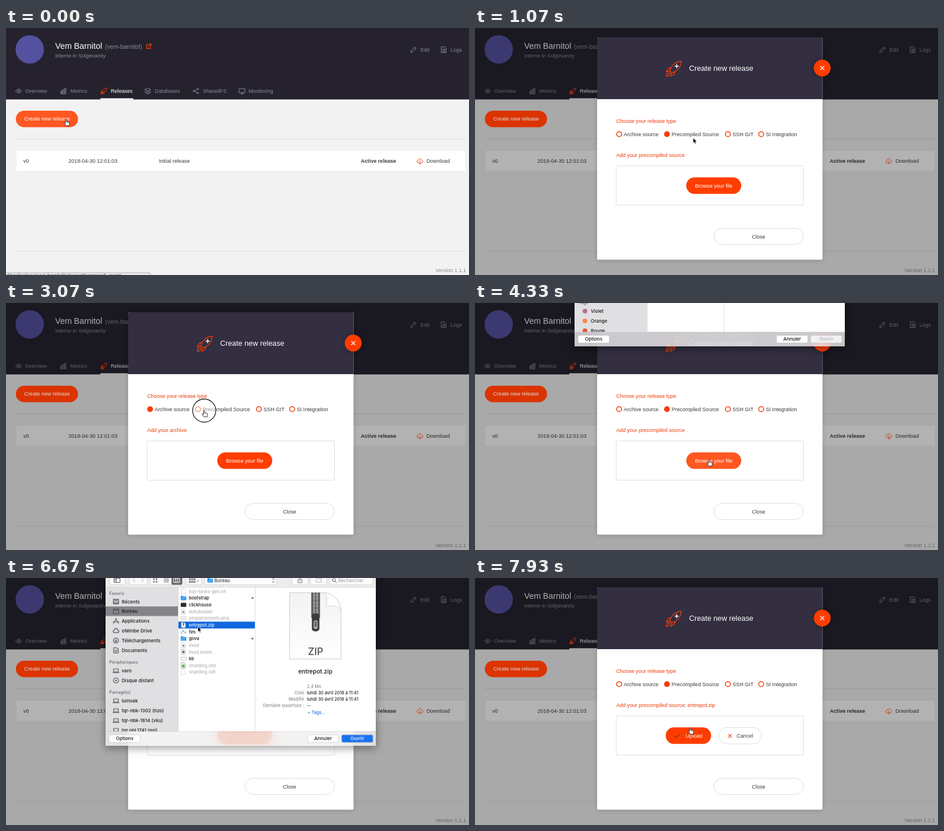
An HTML page that plays this animation: 800x427 px, repeating every 8000 ms.

```html
<!DOCTYPE html>
<html lang="fr">
<head>
<meta charset="utf-8">
<title>Create new release</title>
<style>
  html, body { margin: 0; width: 100%; height: 100%; overflow: hidden; }
  #stage { position: relative; width: 800px; height: 427px; overflow: hidden; background: #f2f2f3; }
  svg { position: absolute; left: 0; top: 0; display: block; }
  #web { font: 9.1px "Liberation Sans", Arial, sans-serif; }
  #sheet { position: absolute; left: 0; top: 0; width: 800px; height: 295px; font: 8.1px Inter, sans-serif; will-change: transform; }
  #shadow { position: absolute; left: 172px; top: 0; width: 467px; height: 294.5px; box-shadow: 0 4px 14px rgba(0,0,0,.4), 0 0 1px rgba(0,0,0,.6); }
  #footer { position: absolute; left: 172px; top: 270px; width: 467px; height: 24.5px; background: rgba(240,240,240,.8); backdrop-filter: blur(13px); }
  .line { fill: none; stroke-linecap: round; stroke-linejoin: round; }
  .mid { text-anchor: middle; }
  .end { text-anchor: end; }
</style>
</head>
<body>
<div id="stage">
  <svg id="web" width="800" height="427"></svg>
  <div id="sheet">
    <div id="shadow"></div>
    <svg id="browser" width="800" height="270"></svg>
    <div id="footer"></div>
    <svg id="actions" width="800" height="25" viewBox="0 270 800 25" style="top:270px"></svg>
  </div>
  <svg id="pointer" width="800" height="427"></svg>
</div>
<script>
const LOOP = 8000;
const ORANGE = '#ff3d00', HOVER = '#ff5722', MUTED = '#8b8993', INK = '#3b3a42';
const $ = id => document.getElementById(id);

const text = (x, y, s, fill, more = '') => `<text x="${x}" y="${y}" fill="${fill}" ${more}>${s}</text>`;
const rect = (x, y, w, h, fill, more = '') => `<rect x="${x}" y="${y}" width="${w}" height="${h}" fill="${fill}" ${more}/>`;
const line = (d, stroke, width = 1, more = '') => `<path class="line" d="${d}" stroke="${stroke}" stroke-width="${width}" ${more}/>`;
const disc = (x, y, r, fill, more = '') => `<circle cx="${x}" cy="${y}" r="${r}" fill="${fill}" ${more}/>`;
const group = (id, body) => `<g id="${id}">${body}</g>`;
const icon = (x, y, d, stroke = MUTED, width = 1) => line(d, stroke, width, `transform="translate(${x} ${y})"`);
const rocket = (x, y, scale, width) => line(
  'M-7 4C-5-4 1-12 13-13C12-1 4 5-4 7ZM-5-2L-9-1-13 5-7 4M2 5L1 9-5 13-4 7M-8 7C-12 7-13 10-13 13C-10 13-7 12-7 8',
  ORANGE, width, `transform="translate(${x} ${y}) scale(${scale})"`);

// ---- web page -------------------------------------------------------------
const tabs = [
  [22, 33, 'Overview', 'M-5 0C-2-4.5 2-4.5 5 0C2 4.5-2 4.5-5 0ZM-1.5 0a1.5 1.5 0 1 0 3 0a1.5 1.5 0 1 0-3 0'],
  [99, 111, 'Metrics', 'M-4.5 4.5V0h2.3v4.5ZM-1.2 4.5V-2.5h2.3v7ZM2.3 4.5V-4.5h2.3v9Z'],
  [245, 257, 'Databases', 'M0-5L5-2.5 0 0-5-2.5ZM-5 0L0 2.5 5 0M-5 2.5L0 5 5 2.5'],
  [328, 340, 'SharedFS', 'M-1.5-.6L2-2.8M-1.5.6L2 2.8M-4.6 0a1.5 1.5 0 1 0 3 0a1.5 1.5 0 1 0-3 0M2-3.5a1.5 1.5 0 1 0 3 0a1.5 1.5 0 1 0-3 0M2 3.5a1.5 1.5 0 1 0 3 0a1.5 1.5 0 1 0-3 0'],
  [408, 419, 'Monitoring', 'M-5-4H5V2.5H-5ZM0 2.5V5M-2.5 5H2.5']
];

const page =
  rect(0, 0, 800, 123.5, '#25222e') +
  disc(41, 37, 24.5, '#5451a0') +
  text(85, 36, 'Vem Barnitol', '#fff', 'font-size="14.3"') +
  text(171, 36, '(vem-barnitol)', MUTED, 'font-size="10.4"') +
  icon(246.5, 31.5, 'M-.5-3H-3.5V3.8H3V1M1-3.8H4V-.8M4-3.8L-.5.7', ORANGE, 1.2) +
  text(85, 51, 'interne in Solgevanity', MUTED) +
  icon(704, 37.5, 'M-4.5 4.5L-3.8 1.5 2.5-4.8 4.8-2.5-1.5 3.8ZM1-3.3L3.3-1') + text(716, 41, 'Edit', MUTED) +
  icon(756.5, 37.5, 'M-4-5H1.5L4-2.5V5H-4ZM-2-1H2M-2 1H2M-2 3H2') + text(768, 41, 'Logs', MUTED) +
  tabs.map(([x, tx, label, d]) => icon(x, 109, d) + text(tx, 112, label, MUTED)).join('') +
  text(181, 112, 'Releases', '#fff') + rect(163, 121.5, 57, 2.3, '#fff') +
  line('M17 191.5H795M17 386H795', '#dcdcde') +
  rect(17.5, 211.5, 777, 36, '#fff', 'stroke="#ebebed" stroke-width=".7" rx="1"') +
  text(30, 233, 'v0', INK) + text(108, 233, '2018-04-30 12:01:03', INK) + text(264, 233, 'Initial release', INK) +
  text(613, 233, 'Active release', INK, 'font-weight="700"') + text(726.5, 233, 'Download', INK) +
  text(742, 422, 'Version 1.1.1', '#8d8d90') +
  group('status', rect(-2, 423, 252, 8, '#e9e9ea', 'rx="2" stroke="#a5a5a8" stroke-width=".8"') +
    text(-8, 431, 'oad/applications/vem-barnitol/releases?command=create', '#333', 'font-size="8.2"'));

const bright = rocket(169, 109, .41, 2.4) +
  icon(715, 230, 'M-2 3H-3C-6 2.5-5.5-1-3-1C-2.5-5 2.5-5 3-1.5C6-1.5 6 3 3 3H2M0-.5V5M-1.6 3.5L0 5 1.6 3.5', '#ee4310') +
  rect(17, 143, 107.5, 28.5, ORANGE, 'rx="14.2" id="create"') + text(31.5, 160.3, 'Create new release', '#fff');

const radios = [[249, 'Archive source'], [331.7, 'Precompiled Source'], [437, 'SSH GIT'], [494.5, 'SI Integration']];

const pill = (x, w, fill, more) => rect(x, 258.3, w, 28.5, fill, `rx="14.2" ${more || ''}`);
const modal =
  rect(211, 17, 389.5, 384, '#000', 'rx="2" opacity=".18" filter="url(#soft)"') +
  rect(211, 16, 389.5, 384.5, '#fff', 'rx="2"') +
  '<path d="M211 123V18q0-2 2-2H598.500q2 0 2 2V123Z" fill="#342e41"/>' +
  rocket(343.5, 70.5, 1, 1.3) + line('M348.500 63V69M345.500 66H351.500', '#fff', 1.4) +
  text(370, 74, 'Create new release', '#fff', 'font-size="12.8"') +
  disc(600, 69.5, 15.5, '#000', 'opacity=".2" filter="url(#soft)"') + disc(600, 69.3, 14.6, ORANGE) +
  line('M597 66.300L603 72.300M603 66.300L597 72.300', '#fff', 1.3) +
  text(244, 163.6, 'Choose your release type', '#ea3c0b') +
  radios.map(([x, label], i) =>
    disc(x, 183.5, 4.3, '#fff', `stroke="#f03c08" stroke-width="1.5" id="radio${i}"`) + text(x + 8, 187, label, INK)).join('') +
  text(244, 223.3, '', '#ea3c0b', 'id="prompt"') +
  rect(244, 238.3, 323.5, 68, '#fff', 'stroke="#dededf" rx="1.5"') +
  group('browse', pill(365, 95, ORANGE, 'id="browsePill"') + text(412.5, 275.6, 'Browse your file', '#fff', 'class="mid"')) +
  group('upload', pill(329.5, 78.5, ORANGE) + line('M345.500 273.500L348 276 353.500 270', '#96300f', 1.2) + text(364, 276, 'Upload', '#fff') +
    pill(421, 74, '#fff', 'stroke="#dededf"') + line('M438 270.500L443 275.500M443 270.500L438 275.500', '#f03c08', 1.2) + text(452, 276, 'Cancel', INK)) +
  rect(412.8, 346.3, 154.7, 28, '#fff', 'rx="14" stroke="#dededf"') + text(490, 363.6, 'Close', INK, 'class="mid"');

$('web').innerHTML =
  '<defs><filter id="soft" x="-20%" y="-20%" width="140%" height="140%"><feGaussianBlur stdDeviation="4"/></filter></defs>' +
  page + rect(0, 0, 800, 427, '#000', 'id="veil"') + group('bright', bright) + group('modal', modal);

// ---- file sheet -----------------------------------------------------------
const GLYPH = {
  tray: 'M-4.500-4H4.500V4H-4.500ZM-4.500 1H-2L-1 2.500H1L2 1H4.500M-2.500-2H2.500',
  desk: 'M-4.500-4H4.500V4H-4.500ZM-4.500-2H4.500',
  apps: 'M-4.500 4L.5-4.500M4.500 4L-.5-4.500M-5 1.500H5',
  cloud: 'M-3 3C-6 3-5.500-1-3-1C-2.500-5 2.500-5 3-1C6-1 6 3 3 3Z',
  down: 'M-4.500 0a4.500 4.500 0 1 0 9 0a4.500 4.500 0 1 0-9 0M0-2.500V2.500M-2 .5L0 2.500 2 .5',
  doc: 'M-4-4.500H1L4-2V4.500H-4ZM-2 0H2M-2 2H2',
  laptop: 'M-4-3H4V2H-4ZM-5.500 3.500H5.500',
  disk: 'M-4.500 0a4.500 4.500 0 1 0 9 0a4.500 4.500 0 1 0-9 0M-1 0a1 1 0 1 0 2 0a1 1 0 1 0-2 0'
};
const place = (y, glyph, label) => icon(190, y, GLYPH[glyph], '#4c4c50', 1.1) + text(200, y + 3, label, '#19191b', 'font-weight="500"');
const heading = (y, label) => text(178.5, y + 2.7, label, '#747478', 'font-size="7.3" font-weight="600"');
const tag = (y, color, label) => disc(190, y, 4, color) + text(200, y + 3, label, '#19191b', 'font-weight="500"');
const folder = (x, y) => `<path d="M${x} ${y - 4}h3.500l1 1.200h5v6.500h-9.500z" fill="#2e9af2"/>` +
  line(`M${x + 2} ${y + 1.5}l1.500-2M${x + 5} ${y + 1.5}l1.500-2`, '#bfe2ff', .8);
const sheetPaper = (x, y, color) => `<path d="M${x + 1} ${y - 4.500}h5l2 2v7h-7z" fill="#fff" stroke="${color}" stroke-width=".7"/>`;
const badge = (x, y) => sheetPaper(x, y, '#bbb') + disc(x + 4.5, y + .7, 2, '#8c91a8');

const files = [
  ['bqv-tasks-gen.sh', 0, (x, y) => sheetPaper(x, y, '#ccc')],
  ['bootstrap', 1, folder],
  ['clickhouse', 1, (x, y) => rect(x, y - 3.5, 9.5, 7, '#2a2a2c', 'rx=".8"')],
  ['dotubuilder', 0, badge],
  ['emplacements.png', 0, (x, y) => rect(x, y - 3, 9.5, 6, '#eee', 'stroke="#ccc" stroke-width=".6"')],
  ['entrepot.zip', 1, (x, y) => sheetPaper(x, y, '#aaa') + rect(x + 3.8, y - 4, 1.6, 5, '#444')],
  ['fim', 1, (x, y) => rect(x, y - 3.5, 9.5, 7, '#fff', 'stroke="#ccc" stroke-width=".6"') + line(`M${x + 1} ${y + 2}l3-4 2 3h3`, '#3b6fd0', .9)],
  ['gova', 1, folder],
  ['ilvod', 0, badge],
  ['ilvod.bmml', 0, (x, y) => sheetPaper(x, y, '#aaa') + disc(x + 4.5, y, 2.4, '#777')],
  ['kb', 1, (x, y) => rect(x, y - 3, 9.5, 6, '#f4f4f4', 'stroke="#bbb" stroke-width=".6"')],
  ['sharding.ods', 0, (x, y) => sheetPaper(x, y, '#4c9a35') + rect(x + 2.5, y - 1.5, 4, 4.5, '#59a83f')],
  ['sharding.odt', 0, (x, y) => sheetPaper(x, y, '#ccc')]
];
const rowY = i => 28 + i * 11.64;
const arrow = y => `<path d="M424.500 ${y - 2}l4 2-4 2z" fill="#666"/>`;
const listing = files.map(([name, enabled, draw], i) => {
  const y = rowY(i);
  return draw(302, y) + text(316, y + 2.8, name, enabled ? '#111' : '#b2b2b4', `id="file${i}"`) + (draw === folder ? arrow(y) : '');
}).join('');

const button = (x, w) => rect(x, -6, w, 22.5, '#fbfbfb', 'rx="2.5" stroke="#c6c6c8" stroke-width=".7"');
const toolbar = rect(172, 0, 467, 21, '#eeedee') + line('M172 21H639', '#cfcfd1', .8) +
  [[179, 27], [213, 31.5], [249, 55], [311, 27], [343, 125], [494, 28], [526, 28], [559, 75]].map(b => button(...b)).join('') +
  rect(286, -6, 18.5, 22.5, '#68686c', 'rx="2"') +
  icon(192, 9, 'M-5-3.500H5V3.500H-5ZM-1.500-3.500V3.500M-4-1.500H-2.800M-4 .5H-2.800', '#555') +
  icon(221, 9, 'M1.500-3L-1.500 0 1.500 3', '#aaa') + icon(236, 9, 'M-1.500-3L1.500 0-1.500 3', '#aaa') +
  icon(258, 9, 'M-3-3h1.500v1.500h-1.500zM1.500-3h1.500v1.500h-1.500zM-3 1.500h1.500v1.500h-1.500zM1.500 1.500h1.500v1.500h-1.500z', '#555') +
  icon(277, 9, 'M-4-3H4M-4-1H4M-4 1H4M-4 3H4', '#666', .8) +
  icon(295, 9, 'M-5-3.500H5V3.500H-5ZM-1.700-3.500V3.500M1.700-3.500V3.500', '#fff') +
  icon(322, 9, 'M-5-3h2v2h-2zM-1-3h2v2h-2zM3-3h2v2h-2zM-5 1.500h2v2h-2zM-1 1.500h2v2h-2zM3 1.500h2v2h-2zM8 0l1.500 1.500L11 0', '#555') +
  folder(348, 9) + text(360, 12, 'Bureau', '#222') + icon(462, 9, 'M-2-1.500L0-3.500 2-1.500M-2 1.500L0 3.500 2 1.500', '#555') +
  icon(508, 9, 'M-1.500-1.500H-3.500V4H3.500V-1.500H1.500M0 1.500V-4.500M-1.500-3L0-4.500 1.500-3', '#777') +
  icon(540, 9, 'M-5 0L-3-3H5V3H-3Z', '#aaa') +
  icon(567, 9, 'M1.500 1.500L4 4M-3-.5a2.600 2.600 0 1 0 5.200 0a2.600 2.600 0 1 0-5.200 0', '#555') +
  text(574, 12, 'Rechercher', '#9b9b9e');

const detail = (y, label, value) => text(515, y, label, '#8b8b8e', 'class="end"') + text(520, y, value, '#222');
const teeth = Array.from({ length: 15 }, (_, i) => `M531 ${31 + i * 2.6}H539`).join('');
const preview =
  rect(298, 80.3, 132, 11.8, '#1167e0') + sheetPaper(302, rowY(5), '#aaa') + rect(305.8, 82.2, 1.6, 5, '#444') +
  text(316, rowY(5) + 2.8, 'entrepot.zip', '#fff') +
  '<path d="M490 30H550C566 32 578 46 579 60V145H490Z" fill="url(#paper)" stroke="#bbb" stroke-width=".8"/>' +
  '<path d="M550 30C556 36 556 46 552 55C562 51 573 52 579 60C578 46 566 32 550 30Z" fill="#fff" stroke="#c4c4c6" stroke-width=".7"/>' +
  rect(527.5, 30, 15, 44, '#58585b') + line(teeth, '#d7d7da', 1.2) + line('M535 30V72', '#333', 1) +
  rect(528.5, 66, 13, 31, '#3b3b3e', 'rx="5"') + rect(531.5, 78, 7, 15, '#a7a7aa', 'rx="3"') + rect(533.3, 80, 3.4, 9, '#5e5e62', 'rx="1.500"') +
  text(535, 138, 'ZIP', '#4a4a4d', 'class="mid" font-size="17"') +
  text(534.5, 169.6, 'entrepot.zip', '#111', 'class="mid" font-size="10.2"') +
  `<g font-size="7.4" font-weight="500">${text(520, 195, '2,4 Mo', '#8b8b8e')}${
    detail(206, 'Créé', 'lundi 30 avril 2018 à 11:41')}${detail(217.3, 'Modifié', 'lundi 30 avril 2018 à 11:41')}${
    detail(228.5, 'Dernière ouverture :', '--')}${text(521, 240, '+ Tags…', '#1673e0')}</g>`;

$('browser').innerHTML =
  '<defs><linearGradient id="paper" x2="0" y2="1"><stop stop-color="#f3f3f3"/><stop offset="1" stop-color="#fff"/></linearGradient></defs>' +
  rect(172, 0, 467, 270, '#fff') + rect(172, 0, 125.500, 270, '#e0dfe1') +
  rect(172, 54, 125.5, 16.6, '#838388') + line('M297.500 0V270M430.500 0V270', '#d5d5d7', .8) +
  heading(31, 'Favoris') + place(45.6, 'tray', 'Récents') + place(62.5, 'desk', 'Bureau') + place(79.2, 'apps', 'Applications') +
  place(96.1, 'cloud', 'oNimbe Drive') + place(113, 'down', 'Téléchargements') + place(130, 'doc', 'Documents') +
  heading(150.6, 'Périphériques') + place(165, 'laptop', 'varo') + place(182, 'disk', 'Disque distant') +
  group('tags', heading(219.5, 'Tags') + tag(234, '#b0708c', 'Violet') + tag(251, '#ff8748', 'Orange') + tag(268, '#f0502e', 'Rouge')) +
  group('shared', heading(202, 'Partagé(s)') + place(217, 'laptop', 'lumvak') + place(234, 'laptop', 'tqr-nbk-1302 (hzo)') +
    place(251, 'laptop', 'tqr-nbk-1814 (vku)') + place(268, 'laptop', 'tqr.nbl.1741 (gsi)')) +
  `<g id="listing" font-size="7.600" font-weight="500">${listing}</g>` +
  `<g id="preview" font-weight="500" font-size="7.600">${preview}</g>` + toolbar;

const action = (x, label, fill, color) => rect(x, 276, 54, 13, fill, 'rx="2.500" stroke="#bdbdc0" stroke-width=".6"') +
  text(x + 27, 285.5, label, color, 'class="mid" font-weight="500"');
$('actions').innerHTML = line('M172 270.300H639', '#c9c9cb', .7) + action(178, 'Options', '#fff', '#111') + action(521, 'Annuler', '#fff', '#111') +
  action(580, 'Ouvrir', '#f1f1f1', '#b0b0b2') + group('openReady', action(580, 'Ouvrir', '#1a72ee', '#fff'));

$('pointer').innerHTML = group('cursor',
  disc(0, 0, 20, '#fff', 'fill-opacity=".45" stroke="#1a1a1a" stroke-width="1.300" id="ring"') +
  '<path id="arrow" d="M0 0V9.200L2.100 7.300 3.500 10.400 5 9.800 3.700 6.800H6.500Z" fill="#000" stroke="#fff" stroke-width=".7"/>' +
  '<path id="hand" d="M-1 1C-1-.4 1-.4 1 1V4L4.500 4.800C6 5.200 6 6.500 5.500 8.500L5 11H0L-3.500 6.500C-4 5.500-2.500 5-1 6.500Z" fill="#fff" stroke="#111" stroke-width=".9"/>');

// ---- motion ---------------------------------------------------------------
const path = [ // time, x, y of the pointer tip
  [0, 104, 158], [330, 104, 158], [950, 374, 188], [1070, 377, 190], [1250, 379, 191], [1700, 265, 184],
  [2300, 265, 184], [2800, 342.5, 186], [3250, 342.5, 186], [3800, 404, 271], [5150, 405, 271],
  [5850, 331.5, 84], [6950, 331.5, 84], [7700, 368, 256], [7930, 372, 259], [8000, 372, 259]
];
const hands = [[0, 400], [1620, 2080], [2700, 3300], [3680, 4400], [7600, 8000]];
const clicks = [130, 1780, 2980, 4030, 5950, 6420];
const CLICK = 190;

const within = (t, a, b) => t >= a && t < b;
const ramp = (t, a, length) => Math.min(1, Math.max(0, (t - a) / length));
const show = (id, on) => { $(id).style.display = on ? '' : 'none'; };

function pointerAt(t) {
  const i = path.findIndex((p, k) => k && t <= p[0]);
  const [t0, x0, y0] = path[i - 1], [t1, x1, y1] = path[i];
  const p = ramp(t, t0, t1 - t0), e = p * p * (3 - 2 * p);
  return [x0 + (x1 - x0) * e, y0 + (y1 - y0) * e];
}

function render(t) {
  const fade = ramp(t, 330, 200);
  $('veil').setAttribute('opacity', .3 * fade);
  $('modal').setAttribute('opacity', fade);
  $('bright').style.filter = `brightness(${1 - .14 * fade})`;
  $('create').setAttribute('fill', t < 400 ? HOVER : ORANGE);
  show('status', t < 400);

  const archive = within(t, 1900, 3130), uploaded = t >= 7080;
  radios.forEach((_, i) => $('radio' + i).setAttribute('fill', i === (archive ? 0 : 1) ? ORANGE : '#fff'));
  $('prompt').textContent = archive ? 'Add your archive' : 'Add your precompiled source' + (uploaded ? ': entrepot.zip' : '');
  show('browse', !uploaded);
  show('upload', uploaded);
  $('browsePill').setAttribute('fill', within(t, 3680, 4900) ? HOVER : ORANGE);

  const opened = Math.sin(ramp(t, 4260, 395) * Math.PI / 2);
  const closed = 1 - Math.cos(ramp(t, 6630, 360) * Math.PI / 2);
  show('sheet', within(t, 4260, 6990));
  $('sheet').style.transform = `translateY(${-305 * (1 - opened + closed)}px)`;
  const loaded = t >= 4700, chosen = t >= 6020;
  show('tags', !loaded);
  show('shared', loaded);
  show('listing', loaded);
  show('preview', chosen);
  show('openReady', chosen);

  const [x, y] = pointerAt(t), hand = hands.some(h => within(t, ...h));
  $('cursor').setAttribute('transform', `translate(${x} ${y})`);
  show('hand', hand);
  show('arrow', !hand);
  show('ring', clicks.some(c => within(t, c, c + CLICK)));
}

const start = performance.now();
function tick() {
  render((performance.now() - start) % LOOP);
  requestAnimationFrame(tick);
}
tick();
</script>
</body>
</html>
```
